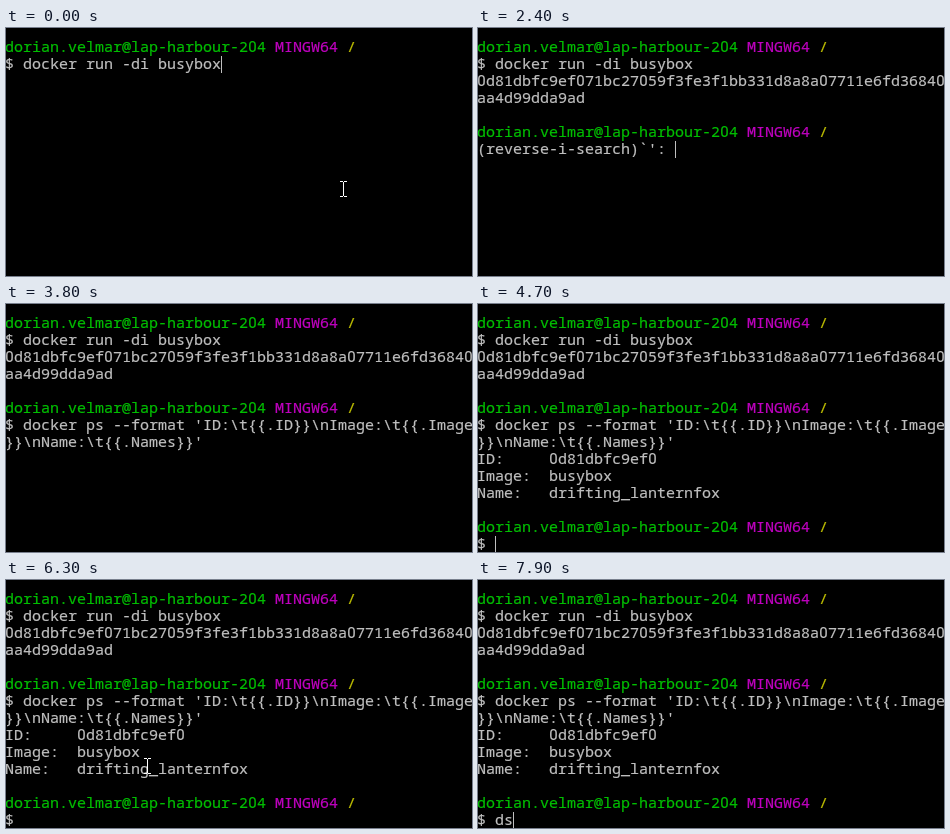
Recreate the animation shown at these times as an HTML page with a canvas. Size 466 by 248 pixels, loop 8000 ms.

```html
<!DOCTYPE html>
<html lang="en">
<head>
<meta charset="utf-8">
<title>Terminal session</title>
<style>
html, body { margin: 0; width: 100%; height: 100%; overflow: hidden; background: #000; }
canvas { display: block; }
</style>
</head>
<body>
<canvas id="stage" width="466" height="248"></canvas>
<script>
const ctx = document.getElementById('stage').getContext('2d');
const LOOP = 8000, TICK = 100, BLINK = 520, BLINK_LEAD = 20;
const COLS = 52, CELL = 9, LINE = 17, LEFT = -1, TOP = 11;
const GRAY = '#bfbfbf', GREEN = '#00bf00', MAGENTA = '#bf00bf', YELLOW = '#bfbf00';
const MONO = '15px "Noto Sans Mono", "DejaVu Sans Mono", monospace';
const PLAIN_ZERO = '15px Roboto, sans-serif';

const HASH = '0d81dbfc9ef071bc27059f3fe3f1bb331d8a8a07711e6fd36840aa4d99dda9ad';
const COMMAND = "docker ps --format 'ID:\\t{{.ID}}\\nImage:\\t{{.Image}}\\nName:\\t{{.Names}}'";
const NAME = 'drifting_lanternfox';
const NAME_ROW = 10, NAME_COL = 8;

const cellX = col => LEFT + col * CELL;
const rowY = row => TOP + row * LINE;
const lerp = (a, b, k) => Math.round(a + (b - a) * k);

// Number of keys pressed by time t, one every interval.
const keysTyped = (t, start, interval, count) =>
  Math.max(0, Math.min(count, Math.floor((t - start) / interval) + 1));

// Writes text on the character grid, wrapping at the right edge.
function write(row, text, color = GRAY, col = 0) {
  ctx.fillStyle = ctx.strokeStyle = color;
  [...text].forEach((char, i) => {
    const cell = col + i;
    const x = cellX(cell % COLS) + CELL / 2;
    const y = rowY(row + Math.floor(cell / COLS)) + 13;
    ctx.font = char === '0' ? PLAIN_ZERO : MONO;
    ctx.fillText(char, x, y);
    ctx.strokeText(char, x, y);
  });
}

function prompt(row) {
  write(row, 'dorian.velmar@lap-harbour-204', GREEN);
  write(row, 'MINGW64', MAGENTA, 30);
  write(row, '/', YELLOW, 38);
}

// The cursor blinks, starting visible at its last move.
function drawCursor(t, row, col, movedAt) {
  if (Math.floor((t - movedAt + BLINK_LEAD) / BLINK) % 2) return;
  ctx.fillStyle = GRAY;
  ctx.fillRect(cellX(col), rowY(row), 1, LINE);
}

function drawPointer(x, y) {
  ctx.fillStyle = '#fff';
  ctx.fillRect(x, y - 7, 1, 14);
  for (const edge of [y - 8, y + 7]) {
    ctx.fillRect(x - 3, edge, 3, 1);
    ctx.fillRect(x + 1, edge, 3, 1);
  }
}

function movePointer(t) {
  const k = Math.min(1, (t - 5200) / 1100);
  const eased = k * k * (3 - 2 * k);
  drawPointer(lerp(341, 141, eased), lerp(152, 186, eased));
}

function drawSearch(t) {
  const keys = keysTyped(t, 2700, TICK, 3);
  const query = 'form'.slice(0, keys && keys + 1);
  const label = "(reverse-i-search)`" + query + "': ";
  const match = query ? COMMAND.indexOf(query) : 0;
  write(6, label + (query && COMMAND));
  drawCursor(t, 6, label.length + match, keys ? 2600 + keys * TICK : 2400);
}

function drawResult(selected) {
  write(8, 'ID:     ' + HASH.slice(0, 12));
  write(9, 'Image:  busybox');
  write(NAME_ROW, 'Name:');
  if (selected) {
    ctx.fillStyle = GRAY;
    ctx.fillRect(cellX(NAME_COL), rowY(NAME_ROW), NAME.length * CELL, LINE);
  }
  write(NAME_ROW, NAME, selected ? '#000' : GRAY, NAME_COL);
}

function drawLastPrompt(t) {
  const keys = keysTyped(t, 7600, 300, 2);
  const text = '$ ' + 'ds'.slice(0, keys);
  prompt(12);
  write(13, text);
  drawCursor(t, 13, text.length, keys ? 7300 + keys * 300 : 4700);
}

function draw(t) {
  ctx.fillStyle = '#000';
  ctx.fillRect(0, 0, 466, 248);
  ctx.textAlign = 'center';
  ctx.lineWidth = 0.2;

  prompt(0);
  write(1, '$ docker run -di busybox');
  if (t < 500) {
    drawCursor(t, 1, 24, 0);
    drawPointer(337, 161);
  }
  if (t >= 800) write(2, HASH);
  if (t >= 1600) prompt(5);
  if (t >= 3800) {
    write(6, '$ ' + COMMAND);
  } else if (t >= 2400) {
    drawSearch(t);
  } else if (t >= 1600) {
    write(6, '$');
    drawCursor(t, 6, 2, 1600);
  }
  if (t >= 4400) drawResult(t >= 6500 && t < 7600);
  if (t >= 4700) drawLastPrompt(t);
  if (t >= 5200 && t < 7600) movePointer(t);
}

function tick() {
  const time = performance.now() % LOOP;
  draw(time - time % TICK);
  requestAnimationFrame(tick);
}
tick();
</script>
</body>
</html>
```
